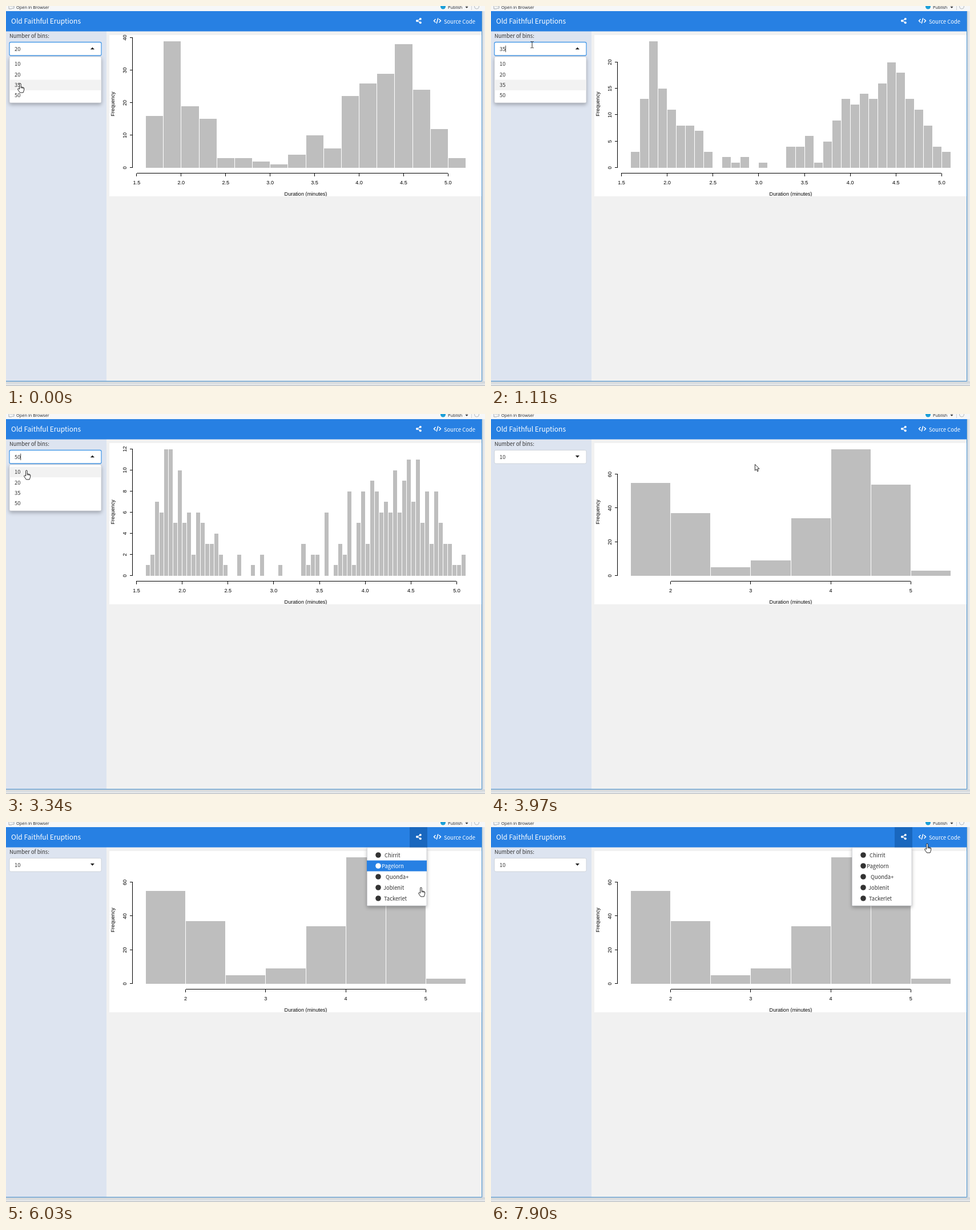
These frames come from a looping animation (839x667 px, 8 s). An HTML page:

```html
<!DOCTYPE html>
<html lang="en">
<head>
<meta charset="utf-8">
<title>Histogram dashboard</title>
<style>
  html, body { margin: 0; width: 100%; height: 100%; overflow: hidden; }
  svg { display: block; width: 839px; height: 667px; }
  text { font: 9.4px "Noto Sans CJK SC", "Noto Sans CJK JP", "Noto Sans CJK", sans-serif; fill: #333; white-space: pre; }
  .white { fill: #fff; font-weight: 500; }
  .title { font-size: 12px; }
  .tool { font: 7.4px "Open Sans", sans-serif; fill: #222; }
  .plot text { font: 9.1px "Liberation Sans", Arial, sans-serif; fill: #000; text-anchor: middle; }
  .axis { stroke: #000; fill: none; shape-rendering: crispEdges; }
  .bars { fill: #bebebe; shape-rendering: crispEdges; }
  .panel { fill: #fff; stroke: #c4c8ce; stroke-width: .7; filter: drop-shadow(0 3px 3px rgba(0, 0, 0, .28)); }
</style>
</head>
<body>
<svg viewBox="0 0 839 667">
  <defs>
    <linearGradient id="below" x2="0" y2="1"><stop stop-color="#cdd2d6"/><stop offset="1" stop-color="#eceef0"/></linearGradient>
    <linearGradient id="beside"><stop stop-color="#cfd5da"/><stop offset="1" stop-color="#eceff2"/></linearGradient>
  </defs>

  <rect width="839" height="667" fill="#f6f7f8"/>
  <rect x="834" y="9" width="5" height="650" fill="url(#beside)"/>
  <rect y="659" width="839" height="8" fill="url(#below)"/>
  <path d="M0 666.5H839" stroke="#b4b8bb"/>

  <path d="M5 -1V5H10M7 0H14V4H10" fill="none" stroke="#8d959c" stroke-width=".8"/>
  <text class="tool" x="18" y="5">Open in Browser</text>
  <circle cx="765.5" cy="1" r="4.5" fill="#1b9fd8"/>
  <text class="tool" x="774" y="5">Publish</text>
  <path d="M804.5 1H809.5L807 4Z" fill="#333"/>
  <path d="M815.5 0V7" stroke="#cfd2d5"/>
  <circle cx="824.5" cy="1" r="4" fill="none" stroke="#b3b8bd"/>

  <rect y="9" width="833" height="649" fill="#f1f1f1"/>
  <rect y="44" width="176" height="614" fill="#dde4f0"/>
  <rect x="181" y="51" width="652" height="283" fill="#fff"/>
  <g class="plot" id="plot">
    <text transform="translate(190 172) rotate(-90)">Frequency</text>
    <text x="525" y="333">Duration (minutes)</text>
  </g>
  <rect x="176" y="334" width="657" height="324" fill="#f1f1f1"/>

  <rect y="9" width="833" height="35.5" fill="#2780e3"/>
  <rect id="shareOn" x="707" y="9" width="31" height="35.5" fill="#1967be"/>
  <path d="M833.5 9V658.5H0" fill="none" stroke="#4b94d2"/>
  <text class="white title" x="9" y="31">Old Faithful Eruptions</text>
  <g fill="#fff" stroke="#fff">
    <path d="M726 23L720 26L726 29" fill="none" stroke-width="1.3"/>
    <g stroke="none"><circle cx="725.8" cy="22.8" r="2"/><circle cx="720" cy="26" r="2"/><circle cx="725.8" cy="29.2" r="2"/></g>
    <path d="M752.5 23L749.5 26L752.5 29M758.5 23L761.5 26L758.5 29M756.8 21.2L754.2 30.8" fill="none" stroke-width="1.5"/>
  </g>
  <text class="white" x="767" y="30.5">Source Code</text>

  <text x="6" y="56">Number of bins:</text>
  <rect id="field" x="6" y="63.5" width="161" height="23.5" rx="2.5" fill="#fff"/>
  <text id="value" x="15" y="78.6"></text>
  <path id="caret" d="M25.7 69.5V81" stroke="#333" stroke-width=".9"/>
  <path id="toggle" fill="#222"/>
  <g id="list"><rect class="panel" x="6" y="89" width="161" height="81" rx="2"/></g>
  <g id="menu"><rect class="panel" x="632.4" y="45" width="104.6" height="102" rx="1"/></g>

  <g id="cursor" stroke="#111" stroke-width=".9" stroke-linejoin="round" fill="#fff">
    <path data-kind="arrow" d="M.4 .4V11.2L2.9 8.9L4.6 12.8L6.2 12.1L4.6 8.2H8Z"/>
    <path data-kind="hand" d="M-1.4 10V1.2A1.3 1.3 0 0 1 1.2 1.2V6L5.4 7Q7 7.4 6.8 9.4L6.3 12.7L5.1 16H-.6L-4 11Q-4.8 9.4 -3.6 8.9Q-2.4 8.7 -1.4 10ZM1.2 6V8.4M3.2 6.6V8.7M5.1 7V9.1"/>
    <path data-kind="beam" d="M-2.6 -5.5H-.8L0 -4.7L.8 -5.5H2.6M0 -4.7V4.7M-2.6 5.5H-.8L0 4.7L.8 5.5H2.6" fill="none"/>
  </g>
</svg>

<script>
const LOOP = 8000;
const $ = id => document.getElementById(id);
const show = (node, on) => node.setAttribute('visibility', on ? 'visible' : 'hidden');

function add(parent, tag, attrs, text = '') {
  const node = document.createElementNS('http://www.w3.org/2000/svg', tag);
  for (const key in attrs) node.setAttribute(key, attrs[key]);
  node.textContent = text;
  return parent.appendChild(node);
}

// Eruptions per 0.05 minutes, from 1.6 on; coarser histograms add these up.
const counts = [
  1, 2, 7, 6, 12, 12, 5, 10, 5, 6, 2, 6, 5, 3, 3, 4, 2, 1, 0, 0, 2, 0, 0, 1,
  0, 2, 0, 0, 0, 1, 0, 0, 0, 0, 3, 1, 2, 2, 0, 6, 0, 1, 3, 2, 8, 1, 5, 8,
  3, 9, 8, 6, 7, 6, 10, 6, 9, 11, 7, 11, 5, 8, 3, 8, 5, 3, 3, 1, 1, 2];

function histogram({ per, from = 1.6, ticks, yStep }) {
  const lead = Math.round((1.6 - from) / 0.05);
  const bars = Array(Math.ceil((counts.length + lead) / per)).fill(0);
  counts.forEach((n, i) => bars[Math.floor((i + lead) / per)] += n);

  const group = add($('plot'), 'g', {});
  const width = 561 / bars.length;
  const max = Math.max(...bars);
  const x = v => 244.5 + (v - from) / (per * 0.05) * width;
  const y = n => 284 - n * 222.5 / max;
  const edge = i => Math.round(245 + i * width);

  bars.forEach((n, i) => n && add(group, 'rect', {
    class: 'bars', x: edge(i), width: edge(i + 1) - edge(i) - 1,
    y: Math.round(y(n)), height: 284 - Math.round(y(n)) }));

  const [first, last, step] = ticks;
  let axes = `M${x(first)} 293.5H${x(last)}`;
  for (let v = first; v <= last; v += step) {
    axes += `M${x(v)} 293.5V298.5`;
    add(group, 'text', { x: x(v), y: 312.6 }, step < 1 ? v.toFixed(1) : v);
  }
  let top = 0;
  for (let n = 0; n <= max + yStep / 20; n += yStep) {
    top = y(n);
    axes += `M216.5 ${top - .5}H221.5`;
    add(group, 'text', { transform: `translate(211 ${top}) rotate(-90)` }, n);
  }
  add(group, 'path', { class: 'axis', d: `${axes}M221.5 284V${top - .5}` });
  return group;
}

const halves = [1.5, 5, .5];
const plots = {
  10: histogram({ per: 10, from: 1.5, ticks: [2, 5, 1], yStep: 20 }),
  20: histogram({ per: 4, ticks: halves, yStep: 10 }),
  35: histogram({ per: 2, ticks: halves, yStep: 5 }),
  50: histogram({ per: 1, ticks: halves, yStep: 2 })
};
// The widest tick of the 20-bin chart sits just above its tallest bar.
add(plots[20], 'path', { class: 'axis', d: 'M221.5 113V55.5H216.5' });
add(plots[20], 'text', { transform: 'translate(211 55.5) rotate(-90)' }, 40);

const listBar = add($('list'), 'rect', { x: 6.5, width: 160, height: 18.5, fill: '#f2f2f2' });
[10, 20, 35, 50].forEach((n, i) => add($('list'), 'text', { x: 15, y: 105.2 + i * 18.4 }, n));

const menuBar = add($('menu'), 'rect', { x: 632, width: 105, height: 19, fill: '#2780e3' });
const menuRows = [['Chirrit', 663], ['Pagelorn', 658], ['Quonda+', 665], ['Joblenit', 661], ['Tackerlet', 662]]
  .map(([name, x], i) => {
    const row = add($('menu'), 'g', {});
    add(row, 'circle', { cx: 652, cy: 58 + i * 19, r: 4.8 });
    add(row, 'text', { x, y: 61.7 + i * 19 }, name);
    return row;
  });

// Runs of evenly spaced picture changes: first, last, count.
const steps = [0];
for (const [first, last, n] of [
  [150, 1110, 8], [1230, 2010, 7], [2260, 2260, 1], [2400, 3340, 8], [3460, 3970, 5], [4100, 4370, 3],
  [4520, 5480, 8], [5890, 6030, 2], [6160, 6810, 6], [6960, 7080, 2], [7220, 7900, 6]])
  for (let i = 0; i < n; i++) steps.push(first + (last - first) * i / Math.max(1, n - 1));

const track = [
  [0, 24.5, 136], [420, 26, 133], [970, 70, 69], [1110, 71.5, 67.5], [1490, 50, 132], [1620, 44, 151],
  [1880, 46, 153], [2010, 62.5, 155], [2260, 66, 150], [2670, 76, 95], [2940, 76, 72], [3340, 36, 99],
  [3590, 44, 99], [3970, 461.5, 88], [4370, 722, 24], [4660, 722, 30], [5070, 722, 60], [5200, 720, 90],
  [5480, 712, 74], [5890, 722, 92], [6030, 726.5, 115], [6160, 725, 122], [6810, 704, 72],
  [7080, 702, 59.5], [7350, 709, 56], [7630, 738, 46], [7900, 763.5, 37.5], [8000, 763.5, 37.5]];

const closed = null;
const none = -1;
const scenes = [
  [0, { bins: 20, value: 20, list: 2, menu: closed, share: false, cursor: 'hand' }],
  [150, { value: 35, list: closed, cursor: 'arrow' }],
  [280, { bins: 35 }],
  [970, { cursor: 'beam' }],
  [1110, { list: 2 }],
  [1350, { list: 0, cursor: 'hand' }],
  [1480, { list: 2 }],
  [1610, { list: 3 }],
  [1740, { value: 50, list: closed, cursor: 'arrow' }],
  [1870, { bins: 50 }],
  [2800, { cursor: 'beam' }],
  [2930, { list: 3 }],
  [3200, { list: 0, cursor: 'hand' }],
  [3460, { value: 10, list: closed, cursor: 'arrow' }],
  [3580, { bins: 10 }],
  [4370, { share: true, cursor: 'hand' }],
  [4520, { menu: none }],
  [4920, { menu: 0 }],
  [5200, { menu: 1 }],
  [6160, { menu: 3 }],
  [6410, { menu: 2 }],
  [6670, { menu: 1 }],
  [6960, { menu: 0 }],
  [7620, { menu: none }]];

function position(t) {
  const i = Math.max(1, track.findIndex(key => key[0] >= t));
  const [a, b] = [track[i - 1], track[i]];
  const k = (t - a[0]) / (b[0] - a[0]);
  return [1, 2].map(axis => a[axis] + (b[axis] - a[axis]) * k);
}

function draw(time) {
  const t = steps.filter(s => s <= time).pop();
  const state = Object.assign({}, ...scenes.filter(s => s[0] <= t).map(s => s[1]));
  const open = state.list !== closed;

  for (const n in plots) show(plots[n], +n === state.bins);

  $('value').textContent = state.value;
  $('field').setAttribute('stroke', open ? '#4a9be8' : '#c8cdd4');
  $('field').setAttribute('stroke-width', open ? 1.3 : .8);
  $('toggle').setAttribute('d', open ? 'M147.8 76.3H155L151.4 72.4Z' : 'M147.8 72.8H155L151.4 76.7Z');
  show($('caret'), open && t >= 1110);
  show($('list'), open);
  listBar.setAttribute('y', 92.7 + (state.list || 0) * 18.4);

  show($('shareOn'), state.share);
  const menuOpen = state.menu !== closed;
  show($('menu'), menuOpen);
  show(menuBar, menuOpen && state.menu !== none);
  menuBar.setAttribute('y', 48.5 + (state.menu || 0) * 19);
  menuRows.forEach((row, i) => {
    const on = i === state.menu;
    row.setAttribute('fill', on ? '#fff' : '#333');
    row.lastChild.setAttribute('class', on ? 'white' : '');
  });

  $('cursor').setAttribute('transform', `translate(${position(t).map(Math.round)})`);
  for (const shape of $('cursor').children) show(shape, shape.dataset.kind === state.cursor);
}

const start = performance.now();
function tick() {
  draw((performance.now() - start) % LOOP);
  requestAnimationFrame(tick);
}
tick();
</script>
</body>
</html>
```
